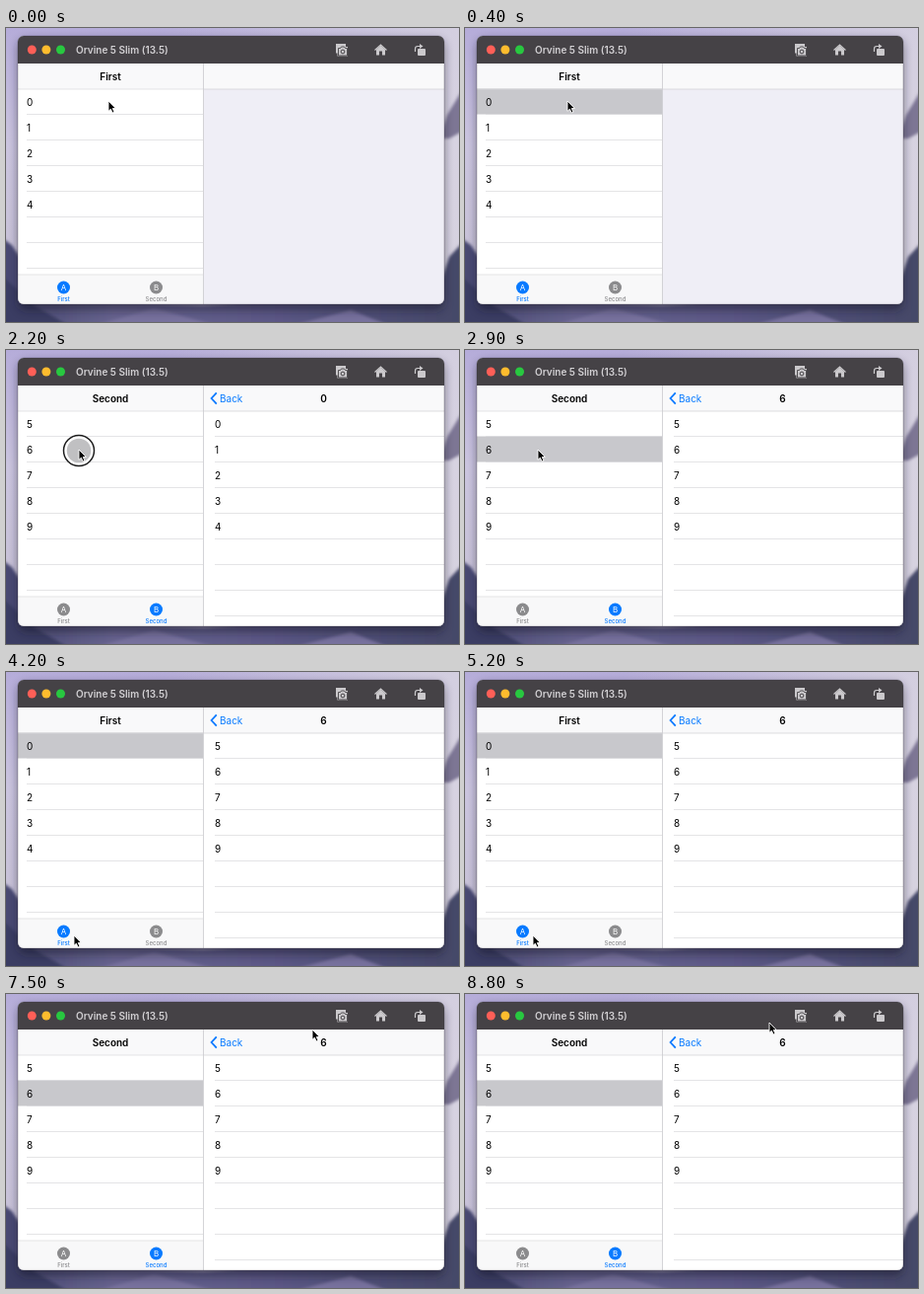
Write an HTML page that moves like this. It is 460 px wide and 298 px high and loops after 8.9 s.

```html
<!DOCTYPE html>
<html lang="en">
<head>
<meta charset="utf-8">
<title>Split view tabs</title>
<style>
  html, body { margin: 0; width: 100%; height: 100%; overflow: hidden; }
  svg { display: block; width: 100%; height: 100%; }
  text { font: 10px Inter, "Liberation Sans", sans-serif; }
  .bold { font-weight: 600; }
  .mid { text-anchor: middle; }
  .tab { font-size: 6px; font-weight: 500; text-anchor: middle; }
  .letter { font-size: 8px; fill: #fff; text-anchor: middle; }
</style>
</head>
<body>
<svg viewBox="0 0 460 298" preserveAspectRatio="none">
  <defs>
    <linearGradient id="sky" x2="0" y2="1">
      <stop offset="0" stop-color="#b5acd9"/>
      <stop offset=".4" stop-color="#cbc5df"/>
      <stop offset=".75" stop-color="#c8c2d8"/>
      <stop offset="1" stop-color="#8983ab"/>
    </linearGradient>
    <linearGradient id="haze">
      <stop offset=".35" stop-color="#d9d5e1" stop-opacity="0"/>
      <stop offset="1" stop-color="#d9d5e1" stop-opacity=".85"/>
    </linearGradient>
    <linearGradient id="hills">
      <stop offset="0" stop-color="#474870"/>
      <stop offset=".25" stop-color="#68648f"/>
      <stop offset=".6" stop-color="#5b5785"/>
      <stop offset="1" stop-color="#444767"/>
    </linearGradient>
    <filter id="blur" x="-20%" y="-20%" width="140%" height="140%"><feGaussianBlur stdDeviation="5"/></filter>
    <filter id="soft"><feGaussianBlur stdDeviation="1.5"/></filter>
    <clipPath id="window"><rect x="12" y="8" width="433" height="272" rx="6"/></clipPath>
    <clipPath id="pane"><rect x="200.5" y="36" width="244.5" height="244"/></clipPath>
  </defs>

  <rect width="460" height="298" fill="url(#sky)"/>
  <rect width="460" height="298" fill="url(#haze)"/>
  <g filter="url(#soft)">
    <path d="M440 112L448 88L465 60V104L450 112Z" fill="#7d7694"/>
    <path d="M-5 212L6 220L14 232L60 276L200 282L440 262L450 232L465 216V305H-5Z" fill="url(#hills)"/>
    <path d="M-5 250L30 282L70 305H-5Z" fill="#3b3d63"/>
    <path d="M90 302L150 284L215 302ZM290 302L350 286L390 302Z" fill="#77719d"/>
  </g>
  <rect x="12" y="12" width="433" height="274" rx="8" fill="#181428" opacity=".5" filter="url(#blur)"/>

  <g clip-path="url(#window)">
    <rect x="12" y="8" width="433" height="272" fill="#fff"/>
    <rect x="12" y="8" width="433" height="28" fill="#454246"/>
    <circle cx="26.3" cy="22" r="4.5" fill="#ff5f57"/>
    <circle cx="40.9" cy="22" r="4.5" fill="#febc2e"/>
    <circle cx="55.5" cy="22" r="4.5" fill="#28c840"/>
    <text x="71" y="25.7" class="bold" fill="#d3d1d4">Orvine 5 Slim (13.5)</text>

    <g fill="#cbc9cc">
      <path d="M335 16h10v3h2v9.5h-10.500v-3H335Z"/>
      <path d="M337.500 20.500h2l1-1.500h3l1 1.500h2V28h-9Z" stroke="#454246" stroke-width=".9"/>
      <circle cx="342" cy="24" r="1.900" fill="none" stroke="#454246"/>
      <path d="M380.500 17.800L385 21.700V27.500H382v-4h-3v4H376V21.700Z"/>
      <path d="M374.500 22.500L380.500 17L386.500 22.500" fill="none" stroke="#cbc9cc" stroke-width="1.200"/>
      <rect x="418" y="21" width="8" height="7" rx="1"/>
      <path d="M415.500 24v-3q0-2.500 2.500-2.500h3" fill="none" stroke="#cbc9cc" stroke-width="1.200"/>
      <path d="M420 16l3.500 2.500L420 21Z"/>
    </g>

    <g id="master"></g>
    <g clip-path="url(#pane)">
      <rect x="200" y="36" width="245" height="244" fill="#efeef6"/>
      <g id="pages"></g>
      <rect x="200" y="36" width="245" height="26" fill="#f9f9fa"/>
      <path d="M200 62h245" stroke="#cfcfd2" stroke-width=".7"/>
      <g id="back" fill="#087aff">
        <path d="M213.800 43.300L208.600 49L213.800 54.700" fill="none" stroke="#087aff" stroke-width="1.800"/>
        <text x="217" y="52.500">Back</text>
      </g>
      <g id="titles"></g>
    </g>
    <path d="M200.500 36v244" stroke="#c9c9cd" stroke-width=".8"/>
  </g>
  <rect x="12" y="8" width="433" height="272" rx="6" fill="none" stroke="#302c38" stroke-opacity=".45" stroke-width=".6"/>

  <g id="ring">
    <circle r="15.500" fill="#fff" fill-opacity=".9" stroke="#1c1c1c" stroke-width="1.500"/>
    <circle r="12.300" fill="#b9b9bb" fill-opacity=".9"/>
  </g>
  <path id="cursor" d="M0 0V10.300L2.400 8.200L4.100 12L6 11.200L4.300 7.500H7.400Z" fill="#000" stroke="#fff" stroke-width=".9" stroke-linejoin="round"/>
</svg>

<script>
const LOOP = 8900, STEP = 100, ROW = 26, TOP = 62;
const BLUE = '#087aff', GRAY = '#8b8b8d';
const $ = id => document.getElementById(id);

// time, x, y
const path = [
  [0, 104, 74], [900, 104, 74], [1250, 153.5, 262], [1600, 153.5, 262],
  [2100, 74, 101], [3100, 74, 101], [3600, 69, 267], [5200, 69, 267],
  [5800, 146, 262], [6500, 146, 262], [7200, 311, 36], [7700, 311, 36],
  [8100, 309, 29], [8900, 309, 29]
];
const presses = [[200, 400], [1200, 1400], [2200, 2400], [3700, 3900], [6000, 6200]];
// time, active tab
const tabs = [[0, 0], [1300, 1], [3800, 0], [6200, 1]];
// time, selected row of each tab
const picks = [[0, -1, -1], [400, 0, -1], [2300, 0, 1]];
const pushes = [
  { at: 400, title: '0', first: 0 },
  { at: 2300, title: '6', first: 5 }
];
const PUSH_MS = 400;

const line = (x1, x2, y) => `<path d="M${x1} ${y}H${x2}" stroke="#d9d9dc" stroke-width=".7"/>`;

function list(first, x, right, count) {
  let out = '';
  for (let i = 0; i < count; i++) {
    if (i < 5) out += `<text x="${x}" y="${TOP + i * ROW + 16.6}">${first + i}</text>`;
    out += line(x, right, TOP + (i + 1) * ROW - .5);
  }
  return out;
}

function tabItem(i, active) {
  const x = 58.5 + i * 94, color = i === active ? BLUE : GRAY;
  return `<circle cx="${x}" cy="263" r="6.500" fill="${color}"/>
    <text x="${x}" y="265.900" class="letter">${'AB'[i]}</text>
    <text x="${x}" y="277" class="tab" fill="${color}">${['First', 'Second'][i]}</text>`;
}

function master(tab, row) {
  const mark = row < 0 ? '' :
    `<rect x="12" y="${TOP + row * ROW - .5}" width="188.500" height="${ROW}" fill="#c8c8cc"/>`;
  return `<rect x="12" y="36" width="188.500" height="26" fill="#f9f9fa"/>
    <text x="106" y="52.500" class="bold mid">${['First', 'Second'][tab]}</text>
    ${mark}${list(tab * 5, 21, 200, 7)}${line(12, 200, 62)}
    <rect x="12" y="250" width="188.500" height="30" fill="#f8f8f9"/>
    ${line(12, 200, 250)}${tabItem(0, tab)}${tabItem(1, tab)}`;
}

$('pages').innerHTML = pushes.map(p =>
  `<g><rect x="200" y="62" width="245" height="218" fill="#fff"/>${list(p.first, 212, 445, 8)}</g>`).join('');
$('titles').innerHTML = pushes.map(p =>
  `<text x="322.500" y="52.500" class="bold mid">${p.title}</text>`).join('');

const latest = (table, t) => table.filter(k => k[0] <= t).pop();
const clamp = v => Math.max(0, Math.min(1, v));
const easeOut = v => 1 - (1 - v) ** 3;
const smooth = v => v * v * (3 - 2 * v);

function pointer(t) {
  const i = Math.max(1, path.findIndex(k => k[0] > t));
  const [t0, x0, y0] = path[i - 1], [t1, x1, y1] = path[i];
  const k = smooth((t - t0) / (t1 - t0));
  return [x0 + (x1 - x0) * k, y0 + (y1 - y0) * k];
}

let drawn = '';
function render(t) {
  const tab = latest(tabs, t)[1], row = latest(picks, t)[tab + 1];
  if (drawn !== tab + ',' + row) {
    $('master').innerHTML = master(tab, row);
    drawn = tab + ',' + row;
  }

  const shown = pushes.map(p => easeOut(clamp((t - p.at) / PUSH_MS)));
  pushes.forEach((p, i) => {
    const enter = shown[i], leave = shown[i + 1] || 0;
    $('pages').children[i].setAttribute('transform', `translate(${245 * (1 - enter) - 73 * leave})`);
    const title = $('titles').children[i];
    title.setAttribute('transform', `translate(${110 * (1 - enter) - 90 * leave})`);
    title.setAttribute('opacity', enter * (1 - leave));
  });
  $('back').setAttribute('opacity', shown[0]);

  const [x, y] = pointer(t);
  $('cursor').setAttribute('transform', `translate(${x} ${y})`);
  $('ring').setAttribute('transform', `translate(${x} ${y + 1})`);
  $('ring').setAttribute('opacity', presses.some(([a, b]) => t >= a && t < b) ? 1 : 0);
}

const start = performance.now();
function tick(now) {
  const t = Math.max(0, now - start) % LOOP;
  render(Math.floor(t / STEP) * STEP);
  requestAnimationFrame(tick);
}
render(0);
requestAnimationFrame(tick);
</script>
</body>
</html>
```
